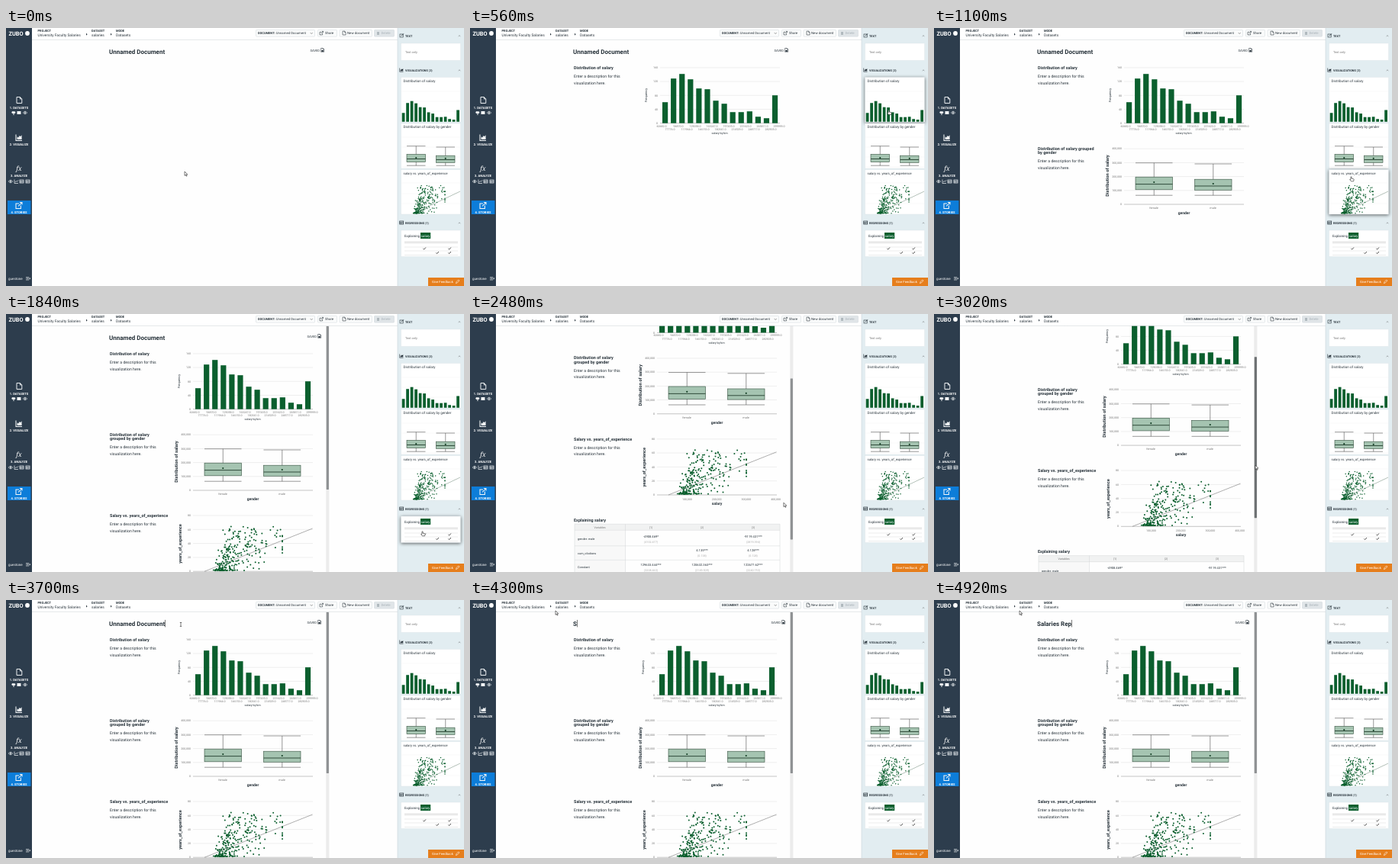
An HTML page for the animation above (4.94 s loop, 600 by 338 pixels).

```html
<!DOCTYPE html>
<html lang="en">
<head>
<meta charset="utf-8">
<title>Story builder</title>
<style>
html, body { margin: 0; width: 100%; height: 100%; overflow: hidden; background: #fefefe; }
svg { display: block; width: 600px; height: 338px; }
text { font-family: Roboto, "Open Sans", sans-serif; text-rendering: geometricPrecision; fill: #27323a; white-space: pre; }
.b { font-weight: 700; }
.w { fill: #fff; }
.g { fill: #777; }
.m { text-anchor: middle; }
.e { text-anchor: end; }
.fx { font-family: "Noto Serif", serif; font-style: italic; }
.card { fill: #fff; stroke: #d9e1e5; stroke-width: .4; }
.hover .card { filter: drop-shadow(0 1px 2px #0009); }
</style>
</head>
<body>
<svg id="stage" viewBox="0 0 600 338"></svg>
<script>
const LOOP = 4940, GREEN = '#0b5f2e', BOX = '#a5c4b1', INK = '#27323a';
const $ = id => document.getElementById(id);

const rect = (x, y, w, h, fill, more = '') => `<rect x="${x}" y="${y}" width="${w}" height="${h}" fill="${fill}" ${more}/>`;
const text = (x, y, s, size, cls = '', more = '') => `<text x="${x}" y="${y}" font-size="${size}" class="${cls}" ${more}>${s}</text>`;
const path = (d, stroke = INK, width = .6, fill = 'none') => `<path d="${d}" stroke="${stroke}" stroke-width="${width}" fill="${fill}"/>`;
const dot = (x, y, r, fill) => `<circle cx="${x}" cy="${y}" r="${r}" fill="${fill}"/>`;
const group = (id, body, more = '') => `<g id="${id}" ${more}>${body}</g>`;
const turned = (x, y, s, size, cls) => text(0, 0, s, size, cls + ' m', `transform="translate(${x} ${y}) rotate(-90)"`);

// Chart data
const bars = [27.5, 58.5, 64.5, 57.5, 45.5, 44.5, 29.5, 25.5, 14.5, 14.5, 15.5, 8.5, 6.5, 36.5];
let seed = 7;
const rnd = () => (seed = seed * 16807 % 2147483647) / 2147483647;
// Salaries are capped at 362; they spread out with experience
const points = Array.from({ length: 270 }, () => {
  const h = 1 + 58 * rnd() ** 2;
  const x = 270 + 8 * (rnd() + rnd()) + h * .2 - (8 + h * .55) * Math.log(1 - rnd());
  return [Math.min(362, x), h];
});

const barChart = (x, base, step, width, scale) =>
  bars.map((h, i) => rect(x + i * step, base - h * scale, width, h * scale, GREEN)).join('');
const boxPlot = (x, w, high, top, mid, bottom, low, mean) => {
  const c = x + w / 2;
  return path(`M${x} ${high}h${w}M${x} ${low}h${w}M${c} ${high}V${low}`, '#555', .6)
    + rect(x, top, w, bottom - top, BOX, 'stroke="#34503f" stroke-width=".6"')
    + path(`M${x} ${mid}h${w}`, '#24402f', .9) + dot(c, mean, 1.1, '#123d23');
};
const grid = (base, gap, labels) => labels.map((s, i) =>
  path(`M245 ${base - i * gap}H402`, i ? '#ddd' : '#888', .5) + text(242, base - i * gap + 1.2, s, 3.6, 'g e')).join('');

// Small icons
const docIcon = (x, y, s, c) => path(`M${x} ${y}h${s * .55}l${s * .3} ${s * .3}v${s * .7}h${-s * .85}zM${x + s * .55} ${y}v${s * .3}h${s * .3}`, c, s * .12);
const barIcon = (x, y, s, c) => path(`M${x} ${y}v${s}h${s}`, c, s * .13)
  + path(`M${x + s * .2} ${y + s * .8}v${-s * .45}l${s * .2} ${s * .15} ${s * .2} ${-s * .3} ${s * .15} ${s * .15} ${s * .2} ${-s * .25}v${s * .7}z`, 'none', 0, c);
const linkIcon = (x, y, s, c) => path(`M${x + s * .5} ${y + s * .2}h${-s * .5}v${s * .8}h${s * .8}v${-s * .5}M${x + s * .4} ${y + s * .6}L${x + s} ${y}m${-s * .38} 0h${s * .38}v${s * .38}`, c, s * .13);
const listIcon = (x, y, c) => rect(x, y, 5, 4, 'none', `stroke="${c}" stroke-width=".7"`) + path(`M${x} ${y + 1.5}h5M${x} ${y + 2.8}h5M${x + 1.7} ${y + 1.5}v2.5`, c, .5);
const eyeIcon = (x, y, c) => path(`M${x - 2.6} ${y}q2.6 -3.6 5.2 0q-2.6 3.6 -5.2 0z`, c, .7) + dot(x, y, .9, c);

function sidebar() {
  const w = '#f3f6f8', label = (y, s) => text(17, y, s, 4.1, 'b w m');
  return rect(0, 0, 34, 338, '#2d3d4d')
    + text(3.5, 10, 'ZUBO', 7.4, 'b w') + dot(28, 7, 2.9, '#fff')
    + docIcon(14, 90.5, 8, w) + label(106, '1. DATASETS')
    + dot(9, 110.5, 1.6, w) + dot(11, 110.7, 1.4, w) + path('M10 110.5v3.6', w, 1)
    + rect(14.5, 109, 5, 4, w) + eyeIcon(25, 111, w)
    + barIcon(13, 139.5, 8, w) + label(153.7, '2. VISUALIZE')
    + text(17, 187, 'fx', 8.5, 'fx w m') + label(194.8, '3. ANALYZE')
    + eyeIcon(6, 201, w) + path('M11 198.5v5h5M12 202l1.5 -1.5 1 .8 1.5 -2', w, .7)
    + listIcon(18, 199, w) + listIcon(26, 199, w)
    + rect(2, 226, 30.5, 18, '#0d7dd9') + linkIcon(13, 228.5, 8, w) + label(242.6, '4. STORIES')
    + text(3, 329.7, 'guestone', 4.5, 'w') + path('M26 326.5h4M26 328.2h3M26 330h4M28 328.2h4m-1.3 -1.2l1.3 1.2-1.3 1.2', w, .6);
}

function header() {
  const crumb = (x, a, b) => text(x, 5.3, a, 4, 'b') + text(x, 11.2, b, 4.85);
  const button = (x, w, fill) => rect(x, 2.5, w, 8.7, fill, 'rx=".7" stroke="#cfd6da" stroke-width=".5"');
  const arrow = x => path(`M${x} 6.7l1.6 1.5-1.6 1.5z`, 'none', 0, INK);
  return rect(34, 0, 479, 15.4, '#fff') + path('M34 15.5H513', '#d4d9dc', .6)
    + crumb(41.5, 'PROJECT', 'University Faculty Salaries') + arrow(105)
    + crumb(112, 'DATASET', 'salaries') + arrow(137) + crumb(144, 'MODE', 'Datasets')
    + button(327.5, 77, '#fafbfb') + text(330, 8.4, '<tspan class="b" font-size="4">DOCUMENT:</tspan> Unnamed Document', 4.3)
    + path('M398.7 6.1l1.5 1.5 1.5 -1.5', '#555', .6)
    + button(408.5, 25, '#fafbfb') + linkIcon(411, 4.4, 4.5, INK) + text(418, 8.4, 'Share', 4.4)
    + button(437, 42.5, '#fafbfb') + docIcon(441, 4.2, 4.8, INK) + text(447, 8.4, 'New document', 4.35)
    + button(482.5, 26, '#e0e5e8') + rect(486, 5, 3, 4, '#b0b9be') + text(491.5, 8.4, 'Delete', 4.3, '', 'style="fill:#a9b2b8"');
}

function panel() {
  const head = (y, s) => text(523, y, s, 3.8, 'b') + path(`M592.7 ${y - .8}l1.3 -1.2 1.3 1.2`, '#555', .5);
  const card = (i, y, h, body) => group('card' + i, rect(517.5, y, 78, h, '#fff', 'class="card"') + body);
  const checks = [[548, 289], [581, 289], [565, 294.5], [581, 294.5]];
  return rect(513, 0, 87, 338, '#e2edf1') + path('M513 0V338', '#cbd6da', .6)
    + rect(516, 8, 4.2, 4, 'none', `stroke="${INK}" stroke-width=".6"`) + path('M518 10.3l2.8 -2.8', INK, .9)
    + head(11.7, 'TEXT') + rect(517.5, 20, 78, 22.5, '#fff', 'class="card"') + text(523, 32.5, 'Text only', 4, 'g')
    + barIcon(515.7, 52.5, 4.8, INK) + head(56.8, 'VISUALIZATIONS (3)')
    + card(1, 64.5, 59, path('M518 83H595M518 96H595M518 109H595', '#eee', .4)
      + text(520.5, 71, 'Distribution of salary', 4.55) + barChart(518.7, 122.8, 5.5, 3.8, .42))
    + card(2, 125, 59, path('M518 143H595M518 156H595M518 169H595M518 182H595', '#eee', .4)
      + text(520.5, 131.2, 'Distribution of salary by gender', 4.55)
      + boxPlot(525, 24.5, 154.7, 165.5, 171.5, 175.5, 180.2, 170)
      + boxPlot(563.5, 24.5, 156, 167.2, 172.5, 176.3, 180.2, 170.8))
    + card(3, 185.5, 58.5, text(520.5, 191.8, 'salary vs. years_of_experience', 4.3)
      + path('M518 203H595M518 217H595M518 230H595', '#eee', .4) + path('M533 243.5L595 214', '#6b8574', .5)
      + points.map(([x, h]) => dot((575 - (362 - x) * .46).toFixed(1), (243.3 - h * .63).toFixed(1), .75, GREEN)).join(''))
    + listIcon(515.7, 253, INK) + head(256.8, 'REGRESSIONS (1)')
    + card(4, 265, 34.5, text(522, 273.7, 'Explaining', 4.4) + rect(543, 268, 13.2, 8, GREEN) + text(549.6, 273.6, 'salary', 4.3, 'w m')
      + rect(522, 279, 70, 3, '#f3f3f3') + path('M522 282H592M522 287H592M522 292H592M522 297.5H592', '#d8d8d8', .5)
      + path('M522 280.6H592', '#ccc', .4) + checks.map(([x, y]) => path(`M${x - 1.6} ${y}l1.2 1.1 2.3 -2.6`, '#222', .8)).join(''))
    + rect(553, 327, 47, 11, '#e67e1c') + text(558, 333.8, 'Give Feedback', 4.3, 'w') + path('M589.5 334.5l.6 -2 2.6 -2.6 1.2 1.2 -2.6 2.6z', '#fff', .6);
}

function documentBody() {
  const title = (y, s) => text(136, y, s, 5.5, 'b');
  const note = y => text(136, y, 'Enter a description for this', 5.2) + text(136, y + 8.3, 'visualization here.', 5.2);
  const bins = Array.from({ length: 15 }, (_, i) =>
    text(247 + i * 11, i % 2 ? 134.3 : 129.6, (60682 + Math.round(i * 17094.1)) + '.0', 3.6, 'g m')).join('');
  const first = title(54, 'Distribution of salary') + note(65.3)
    + `<g class="shift">${grid(124.7, 18.2, [0, 40, 80, 120, 160])}${turned(228, 88, 'Frequency', 4, '')}`
    + barChart(248, 124.7, 11.07, 7.2, 1) + bins + text(323, 139.2, 'salary by bin', 3.8, 'm') + '</g>';
  const money = ['0', '100,000', '200,000', '300,000', '400,000'];
  const second = group('wide', title(159.7, 'Distribution of salary grouped') + title(165, 'by gender'))
    + group('narrow', title(159.7, 'Distribution of salary') + title(165, 'grouped by gender')) + note(176.2)
    + `<g class="shift">${grid(231, 18.2, money)}${turned(225, 193.5, 'Distribution of salary', 5.8, 'b')}`
    + boxPlot(260, 48.5, 176.7, 195.2, 204.6, 211.8, 219.2, 202) + boxPlot(337.5, 48.5, 178, 198.2, 207, 212.3, 219.2, 204)
    + text(284, 237, 'female', 3.8, 'g m') + text(361.5, 237, 'male', 3.8, 'g m') + text(323.5, 244, 'gender', 5, 'b m') + '</g>';
  const third = title(266.2, 'Salary vs. years_of_experience') + note(277.3)
    + `<g class="shift">${grid(337.2, 18.3, [0, 20, 40, 60, 80])}${turned(229.5, 301, 'years_of_experience', 5.6, 'b')}`
    + path('M260 337.2L401.5 281', '#777', .6) + points.map(([x, h]) => dot(x.toFixed(1), (337 - h).toFixed(1), 1, GREEN)).join('')
    + money.slice(1).map((s, i) => text(284.3 + i * 38.8, 343.8, s, 3.6, 'g m')).join('') + text(323.5, 350, 'salary', 5, 'b m') + '</g>';

  const rows = [
    ['gender: male', ['-4908.469*', '(4102.477)'], null, ['-9119.431***', '(2819.394)']],
    ['cum_citations', null, ['4.135***', '(0.138)'], ['4.128***', '(0.128)']],
    ['Constant', ['129633.444***', '(3208.463)'], ['120632.363***', '(2149.509)'], ['122677.62***', '(2240.753)']]
  ];
  const table = title(372.2, 'Explaining salary') + rect(137, 375.5, 269, 8, '#f1f2f2') + rect(137, 383.5, 66.5, 57, '#f8f8f8')
    + path('M137 375.5H406V441H137zM137 383.5H406M137 404H406M137 422.5H406M203.5 375.5V441', '#d2d5d6', .5)
    + ['Variables', '(1)', '(2)', '(3)'].map((s, i) => text(170 + i * 67, 381.2, s, 3.7, 'g m')).join('')
    + rows.map(([name, ...cells], r) => text(141, 396.5 + r * 18.4, name, 3.9)
      + cells.map((c, i) => c ? text(237 + i * 67, 393 + r * 18.4, c[0], 4.1, 'm')
        + text(237 + i * 67, 400 + r * 18.4, c[1], 3.7, 'm', 'style="fill:#aaa"') : '').join('')).join('');

  return rect(135, 26, 0, 9.5, '#a9cdf5', 'id="selection"') + text(135, 33.8, '', 8, 'b', 'id="title"')
    + rect(0, 26, .6, 9.5, '#222', 'id="caret"')
    + `<g class="shift">${text(394.5, 30.8, 'SAVED', 4.1)}${docIcon(408.6, 26.5, 4.8, INK)}${rect(409.5, 29, 2.3, 2, INK)}</g>`
    + [first, second, third, table].map((body, i) => group('part' + i, body)).join('');
}

const cursors = group('arrow', path('M0 0v5.4l1.3 -1.2 .9 2 .9 -.4 -.9 -1.9h1.7z', '#222', .6, '#fff'))
  + group('hand', path('M0 0q.8 -.6 1.1 .3v1.8l2.6 .7q.5 .3 .4 1l-.5 2h-3.2l-1.7 -2.3q.1 -.8 1.3 -.1z', '#222', .6, '#fff'))
  + group('beam', path('M-1.2 -2.5h2.4M0 -2.5v5M-1.2 2.5h2.4', '#222', .6));

$('stage').innerHTML = rect(0, 0, 600, 338, '#fefefe') + group('doc', documentBody())
  + group('bar', rect(419.3, 15.5, 4, 323, '#ececec') + rect(419.7, 16, 3.2, 214, '#8e9193', 'id="thumb" rx=".4"'))
  + header() + panel() + sidebar() + group('pointer', cursors);

const DRAG = 2815, DROP = 3290, MAX_SCROLL = 104, TYPE_AT = 4250, TYPE_STEP = 58;
// Pointer path: time, x, y
const route = [[0, 234, 188], [90, 234, 188], [350, 548, 96], [520, 548, 98], [680, 548, 158], [840, 548, 160],
  [980, 546, 195], [1240, 546, 195], [1520, 545, 285], [1930, 545, 285], [2180, 408, 245], [2640, 412, 248],
  [2770, 421, 229], [DRAG, 421, 229], [DROP, 421, 158], [3560, 229, 32], [3740, 229, 32], [3980, 112, 14], [LOOP, 112, 14]];
const added = [470, 790, 1210, 1900];

const span = (t, a, b) => Math.min(1, Math.max(0, (t - a) / (b - a)));
const smooth = k => k * k * (3 - 2 * k);
const show = (id, on) => $(id).style.display = on ? '' : 'none';

function pointerAt(t) {
  const i = route.findIndex(p => p[0] > t);
  const [a, x, y] = route[i - 1], [b, u, v] = route[i];
  const k = span(t, a, b), f = a === DRAG ? k : smooth(k);
  return [x + (u - x) * f, y + (v - y) * f];
}

function draw(t) {
  const [x, y] = pointerAt(t);
  const tall = t >= added[2], dragging = t >= DRAG && t < DROP;
  added.forEach((at, i) => show('part' + i, t >= at));
  show('bar', tall);
  show('wide', !tall);
  show('narrow', tall);
  document.querySelectorAll('.shift').forEach(g => g.setAttribute('transform', `translate(${tall ? 0 : 4} 0)`));

  const scroll = MAX_SCROLL * (smooth(span(t, 2180, 2520)) - span(t, DRAG, DROP));
  $('doc').setAttribute('transform', `translate(0 ${-scroll})`);
  $('thumb').setAttribute('y', 16 + scroll * 71 / MAX_SCROLL);
  $('thumb').setAttribute('height', t < added[3] ? 214 : 211);
  $('thumb').setAttribute('fill', dragging ? '#6d7072' : '#8e9193');

  const typed = Math.max(0, Math.floor((t - TYPE_AT) / TYPE_STEP) + 1);
  const title = $('title');
  title.textContent = typed ? 'Salaries Report'.slice(0, typed) : 'Unnamed Document';
  const end = 135 + title.getComputedTextLength();
  const from = t > 3740 && !typed ? Math.min(end, Math.max(135, x)) : end;
  $('selection').setAttribute('x', from);
  $('selection').setAttribute('width', end - from);
  $('caret').setAttribute('x', from + .3);
  show('caret', t >= 3620);

  const hit = x < 517 ? 0 : y < 64 ? 0 : y < 124 ? 1 : y < 184.5 ? 2 : y < 245 ? 3 : y > 265 && y < 300 ? 4 : 0;
  for (let i = 1; i < 5; i++) $('card' + i).setAttribute('class', hit === i ? 'hover' : '');
  const beam = t > 3480 && y > 23;
  show('hand', hit);
  show('beam', beam);
  show('arrow', !hit && !beam);
  $('pointer').setAttribute('transform', `translate(${x} ${y})`);
}

function frame() {
  draw(performance.now() % LOOP);
  requestAnimationFrame(frame);
}
frame();
</script>
</body>
</html>
```
